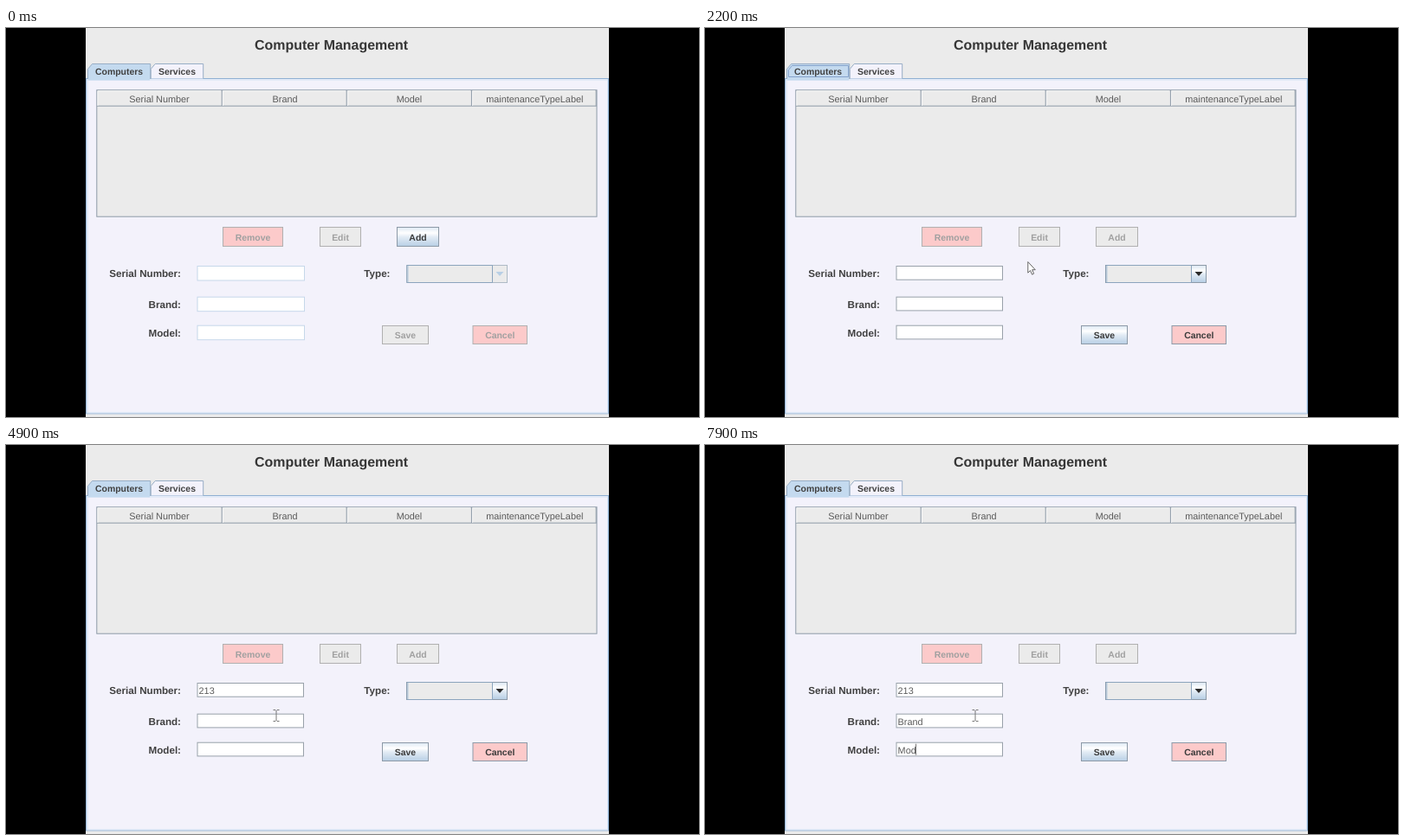
Write an HTML page that moves like this. It is 800x450 px and loops after 8000 ms.

```html
<!DOCTYPE html>
<html lang="en">
<head>
<meta charset="utf-8">
<title>Computer Management</title>
<style>
  html, body { margin: 0; width: 100%; height: 100%; overflow: hidden; background: #000; }
  svg { display: block; width: 100vw; height: 100vh; }
  text { font-family: "Liberation Sans", Arial, sans-serif; fill: #404040; text-rendering: geometricPrecision; }
  .plain { font-size: 10.85px; fill: #5a5a5a; }
  .small { font-size: 10.45px; font-weight: bold; }
  .label { font-size: 11.65px; font-weight: bold; }
  .title { font-size: 15.95px; font-weight: bold; fill: #363636; }
  .mid { text-anchor: middle; }
  .end { text-anchor: end; }
</style>
</head>
<body>
<svg id="stage" viewBox="0 0 800 450" preserveAspectRatio="none">
  <defs>
    <linearGradient id="ocean" x1="0" y1="0" x2="0" y2="1">
      <stop offset="0" stop-color="#dde8f3"/>
      <stop offset=".3" stop-color="#fff"/>
      <stop offset=".5" stop-color="#e3ecf5"/>
      <stop offset="1" stop-color="#b8cfe5"/>
    </linearGradient>
  </defs>
</svg>
<script>
const LOOP = 8000, TICK = 100;
const GREY = '#ebebeb', STEEL = '#8d9aa7', PALE = '#b8cfe5', PINK = '#fccaca';
const stage = document.getElementById('stage');

function add(tag, attrs, text, parent = stage) {
  const el = document.createElementNS('http://www.w3.org/2000/svg', tag);
  for (const key in attrs) el.setAttribute(key, attrs[key]);
  if (text !== undefined) el.textContent = text;
  parent.appendChild(el);
  return el;
}
const set = (el, attrs) => { for (const key in attrs) el.setAttribute(key, attrs[key]); };
const show = (el, on) => set(el, { visibility: on ? 'visible' : 'hidden' });
const box = (x, y, width, height, fill, stroke = 'none') =>
  add('rect', { x, y, width, height, fill, stroke });
const path = (d, stroke, fill = 'none', parent = stage) => add('path', { d, stroke, fill }, undefined, parent);
const label = (x, y, cls, str) => add('text', { x, y, class: cls }, str);

// Window, tabs and content pane
box(92, 0, 604, 450, GREY);
label(287, 25, 'title', 'Computer Management');
box(92.5, 58.5, 603, 387.5, '#f3f2fb', '#8fb0d2');
path('M93 60H695M94 59V445M694.5 59V445M93 445H695', '#d3e3f4');
path('M167.2 58.5V47.5L172.2 41.5H227.7V58.5', '#98aec6', '#f3f2fb');
path('M94.5 59V47.5L99.5 41.5H166.7V59', '#98aec6', '#c4daef');
box(95, 58, 71, 2.5, '#c4daef');
const tabFocus = path('M96.5 56.5V48.5L100.5 43.5H165.5V56.5Z', '#86a3cc');
label(103, 53.5, 'small', 'Computers');
label(176, 53.5, 'small', 'Services');

// Table
box(104.8, 71.8, 577.2, 146.4, GREY, STEEL);
path('M105 90.2H682M249.2 72V90M393.2 72V90M537.4 72V90M681.2 72V90', STEEL);
path('M106 90V73H248M250.5 90V73H392M394.5 90V73H536M538.6 90V73H680', '#f6f6f6');
['Serial Number', 'Brand', 'Model', 'maintenanceTypeLabel'].forEach((name, i) =>
  label([177, 322, 465.5, 610.3][i], 85.8, 'plain mid', name));

// Buttons
function button(x, y, width, height, name) {
  const face = box(x + .5, y + .5, width - 1, height - 1, GREY, '#aaa');
  const text = label(x + width / 2, y + height / 2 + 4, 'small mid', name);
  return (enabled, fill = enabled ? 'url(#ocean)' : GREY) => {
    set(face, { fill, stroke: enabled ? STEEL : '#b0b0b0' });
    text.style.fill = enabled ? '#3a3a3a' : '#a0a0a0';
  };
}
button(250, 230, 70, 23, 'Remove')(false, PINK);
button(362, 230, 48, 23, 'Edit')(false);
const addButton = button(451, 230, 49, 23, 'Add');
const saveButton = button(434, 344, 54, 22, 'Save');
const cancelButton = button(538.5, 344, 63.5, 22, 'Cancel');
const addFocus = add('g');
path('M451.5 252V231.5H499', '#6d8ba8', 'none', addFocus);
path('M464.5 235.5H486.5V249.5H464.5Z', '#9db8d2', 'none', addFocus);

// Form
label(202, 288, 'label end', 'Serial Number:');
label(202, 323.6, 'label end', 'Brand:');
label(202, 356.6, 'label end', 'Model:');
label(443.5, 288, 'label end', 'Type:');

const comboFrame = box(462.5, 274.5, 116, 20, GREY, STEEL);
const comboArrow = box(562, 275, 16, 19, GREY);
path('M463 274.5H561.5V294.5H463Z', '#8ba4bd');
path('M464 275V294', '#b5c9dc');
const triangle = path('M565.5 282H574.5L570 287Z', 'none');

// Each field: top edge, then [time, text] steps
const fields = [
  { y: 275, steps: [[3300, '2'], [3500, '21'], [3800, '213']] },
  { y: 310.7, steps: [[5500, 'B'], [5800, 'Br'], [6000, 'Bra'], [6100, 'Bran'], [6200, 'Brand']] },
  { y: 343.7, steps: [[7000, 'M'], [7300, 'Mo'], [7800, 'Mod']] }
];
for (const f of fields) {
  f.frame = box(221, f.y + .5, 122.5, 16, '#fff', PALE);
  f.text = label(222.6, f.y + 13.1, 'plain', '');
}
const caret = add('path', { stroke: '#777', 'stroke-width': 1 });

// Pointer
const arrow = add('g');
path('M.8 .5V13.2L3.6 10.5L5.6 15.2L7.6 14.2L5.7 9.7H9.3Z', '#666', '#fff', arrow);
const beam = add('g');
path('M-3.5 -6.5H-1L0 -5.5L1 -6.5H3.5M0 -5.5V5.5M-3.5 6.5H-1L0 5.5L1 6.5H3.5', '#777', 'none', beam);

const route = [
  [300, 640, 2], [600, 566, 78], [900, 476, 180], [1100, 440, 219], [1500, 468, 243],
  [1900, 468, 243], [2200, 372, 270], [2500, 329, 280], [3700, 329, 280], [4000, 312, 313]
];
function pointerAt(t) {
  const i = route.findIndex(p => p[0] > t);
  if (i < 0) return route[route.length - 1].slice(1);
  if (i === 0) return null;
  const [a, b] = [route[i - 1], route[i]];
  const k = (t - a[0]) / (b[0] - a[0]);
  return [a[1] + (b[1] - a[1]) * k, a[2] + (b[2] - a[2]) * k];
}
const within = (t, from, to) => t >= from && t < to;

function drawPointer(t) {
  const p = pointerAt(t);
  const typing = p && t >= 2300 && p[0] < 344;
  show(arrow, p && !typing);
  show(beam, typing);
  if (p) set(typing ? beam : arrow, { transform: `translate(${Math.round(p[0])} ${Math.round(p[1])})` });
}

function drawForm(t) {
  const editing = t >= 1900, pressed = within(t, 1700, 1900);
  addButton(!editing, pressed ? '#b0cae2' : undefined);
  saveButton(editing);
  cancelButton(editing, PINK);
  show(addFocus, pressed);
  show(tabFocus, within(t, 600, 1700) || within(t, 1900, 2600));
  set(comboFrame, { stroke: editing ? STEEL : '#aebac6' });
  set(comboArrow, { fill: editing ? 'url(#ocean)' : GREY });
  set(triangle, { fill: editing ? '#2a2a2a' : PALE });

  let lastEdit = 0;
  const active = t >= 6400 ? 2 : t >= 4400 ? 1 : t >= 2600 ? 0 : -1;
  fields.forEach((f, i) => {
    set(f.frame, {
      width: editing ? 122.5 : 123.5, height: editing ? 15.7 : 16.5,
      stroke: editing ? '#98a1aa' : '#c6d8ea'
    });
    const done = f.steps.filter(s => s[0] <= t).pop();
    f.text.textContent = done ? done[1] : '';
    if (i === active) lastEdit = Math.max([2700, 4400, 6400][i], done ? done[0] : 0);
  });

  // The caret blinks every half second, counted from the last edit
  const on = active >= 0 && Math.floor(Math.max(0, t - lastEdit) / 500) % 2 === 0;
  show(caret, on);
  if (on) {
    const f = fields[active];
    const x = Math.floor(222.6 + f.text.getComputedTextLength()) + .5;
    set(caret, { d: `M${x} ${f.y + 2}V${f.y + 15}` });
  }
}

const start = performance.now();
function frame() {
  const t = Math.floor((performance.now() - start) % LOOP / TICK) * TICK;
  drawForm(t);
  drawPointer(t);
  requestAnimationFrame(frame);
}
frame();
</script>
</body>
</html>
```
